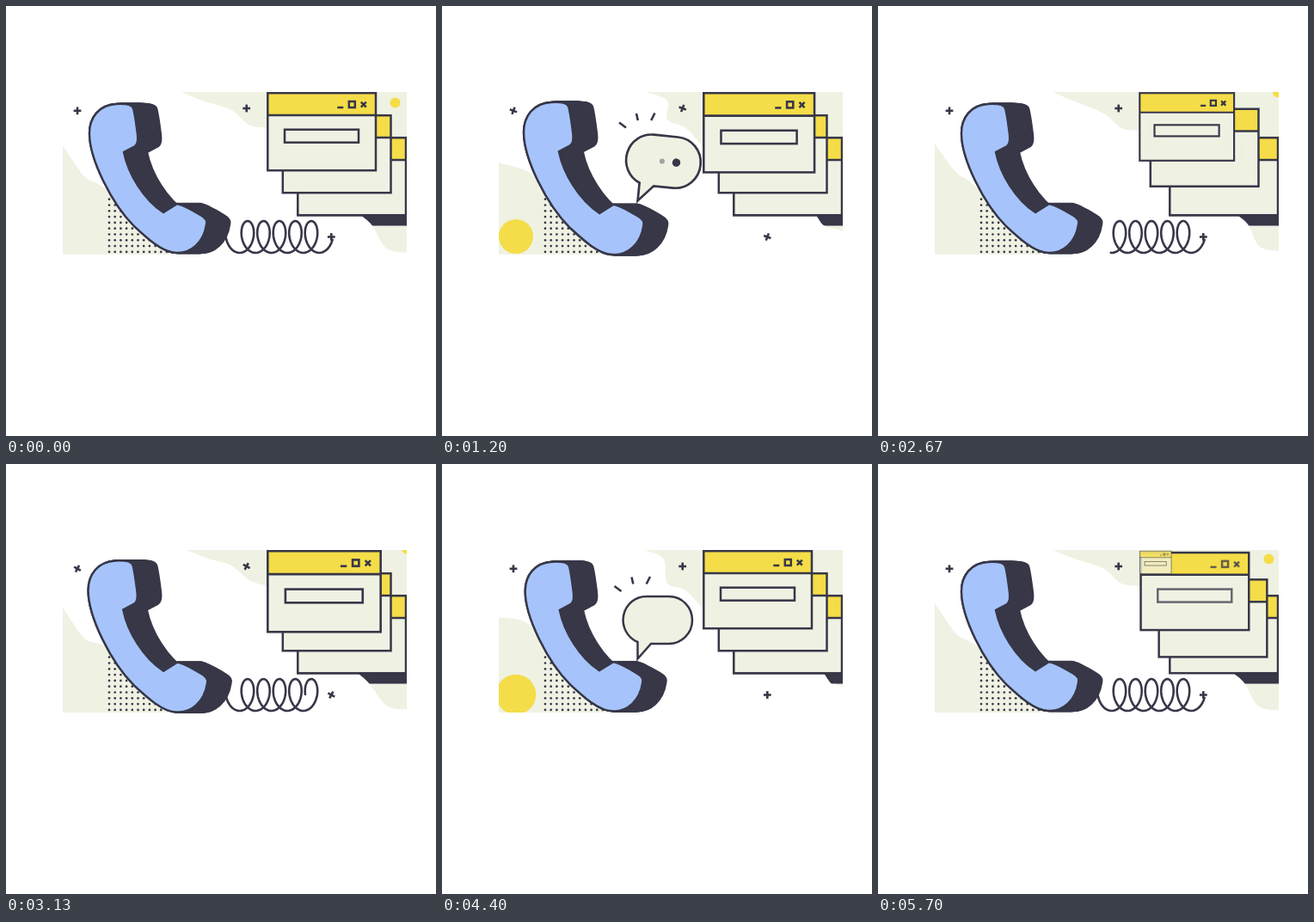
Write an HTML page with a canvas that moves like this. It is 500 px wide and 500 px high and loops after 5730 ms.

```html
<!DOCTYPE html>
<html lang="en">
<head>
<meta charset="utf-8">
<title>Phone and windows</title>
<style>
html, body { margin: 0; width: 100%; height: 100%; overflow: hidden; background: #fff; }
canvas { display: block; width: 500px; height: 500px; }
</style>
</head>
<body>
<canvas id="stage" width="500" height="500"></canvas>
<script>
const ctx = document.getElementById('stage').getContext('2d');
const CYCLE = 2865, BEAT = CYCLE / 3, TYPING = CYCLE / 2;
const DARK = '#373748', CREAM = '#eff2e3', YELLOW = '#f4dd48', BLUE = '#a6c4fb';

const ramp = (t, a, b) => Math.max(0, Math.min(1, (t - a) / (b - a)));
const ease = (t, a, b) => { const u = ramp(t, a, b); return u * u * (3 - 2 * u); };
const mix = (a, b, u) => a + (b - a) * u;

// Edge points: x, y, sway in x and y, and the part of the cycle where the sway peaks.
const leftEdge = [[66, 171, 0, 11, 0.4], [90, 190, 0, 12, 0.15], [104, 198, 0, 10, 0.12],
  [118, 211, 0, 3, 0.9]];
const topEdge = [[220, 100, 17, 0, 0.45], [244, 110, 18, 0, 0.42], [262, 129, 0, 11, 0.62],
  [283, 142, 0, 8, 0.68], [304, 155, 0, 14, 0.55]];
const lowEdge = [[428, 244, 18, 0, 0.6], [438, 255, 16, 0, 0.61], [450, 269, -8, 13, 0.03],
  [466, 273, 0, 14, 0.02]];

const phone = new Path2D('M128,114Q146,113 148,119Q150,126 153,150Q154,160 150,163L137,170' +
  'C142,195 160,225 183,240L199,230Q206,231 226,243Q235,248 233,254C230,275 215,288 198,287' +
  'C182,287 163,269 149,256C123,230 97,178 97,148C97,130 108,115 128,114Z');
const bubble = new Path2D('M227.5,207L227.5,226.5L243,209H264A27,27.5 0 0 0 264,154H238' +
  'A27,27.5 0 0 0 227.5,207Z');

function line(...p) {
  ctx.beginPath();
  for (let i = 0; i < p.length; i += 2) ctx.lineTo(p[i], p[i + 1]);
  ctx.stroke();
}

function disc(x, y, r, color) {
  ctx.fillStyle = color;
  ctx.beginPath();
  ctx.arc(x, y, r, 0, 7);
  ctx.fill();
}

// Scales and turns whatever is drawn next around a fixed point.
function pivot(x, y, scale, angle = 0) {
  ctx.translate(x, y);
  ctx.rotate(angle);
  ctx.scale(scale, scale);
  ctx.translate(-x, -y);
}

// Fills the area between a swaying smooth edge and the given corners.
function blob(t, edge, ...corners) {
  const p = edge.map(([x, y, dx, dy, peak]) => {
    const sway = Math.cos(2 * Math.PI * (t / CYCLE - peak));
    return [x + dx * sway, y + dy * sway];
  });
  ctx.beginPath();
  ctx.moveTo(...p[0]);
  for (let i = 0; i < p.length - 1; i++) {
    const a = p[i], b = p[i + 1], before = p[i - 1] || a, after = p[i + 2] || b;
    ctx.bezierCurveTo(a[0] + (b[0] - before[0]) / 6, a[1] + (b[1] - before[1]) / 6,
      b[0] - (after[0] - a[0]) / 6, b[1] - (after[1] - a[1]) / 6, b[0], b[1]);
  }
  corners.forEach(c => ctx.lineTo(...c));
  ctx.closePath();
  ctx.fillStyle = CREAM;
  ctx.fill();
}

function drawBackground(t) {
  blob(t, leftEdge, [150, 230], [190, 289], [66, 289]);
  blob(t, topEdge, [466, 160], [466, 100]);
  ctx.save();
  blob(t, lowEdge, [466, 244]);
  ctx.clip();
  ctx.fillStyle = DARK;
  ctx.fillRect(400, 240, 66, 15.5);
  ctx.restore();

  const gone = ease(t, 2130, 2560);
  const radius = mix(20, 29, ramp(t, 1200, 2130)) * ease(t, 500, 1000) * (1 - gone);
  disc(86 - 14 * gone, 268 + 16 * gone, radius, YELLOW);

  const untilReset = Math.min(Math.abs(t - 25), CYCLE + 25 - t);
  disc(451 + 0.063 * untilReset, 114 - 0.063 * untilReset, 6, YELLOW);

  for (let row = 0; row < 10; row++)
    for (let col = 0; col < 11; col++)
      disc(120 + col * 6.7, 224.7 + row * 6.8, 1.35, DARK);
}

// The cord retracts into its right end's path, then redraws from right to left.
function drawCord(t) {
  const first = -0.25, last = 5.23, returning = t > CYCLE / 2;
  const from = returning ? mix(last, first, ramp(t, 1885, 2705)) : first;
  const to = returning ? last : mix(last, first, ramp(t, 195, 1010));
  if (from === to) return;
  ctx.lineWidth = 2.6;
  ctx.beginPath();
  for (let i = 0, n = 240; i <= n; i++) {
    const turn = mix(from, to, i / n), a = turn * 2 * Math.PI;
    ctx.lineTo(271.7 + 18.5 * turn + 11.5 * Math.sin(a), 268.5 + 18.5 * Math.cos(a));
  }
  ctx.stroke();
}

function drawPluses(beat) {
  const turn = ramp(beat, 190, 270) * (1 - ramp(beat, 280, 560)) * Math.PI / 6;
  ctx.lineWidth = 2.6;
  for (const [x, y] of [[83, 121.8], [279.7, 119], [378.3, 268.5]]) {
    ctx.save();
    pivot(x, y, 1, turn);
    line(x - 4.4, y, x + 4.4, y);
    line(x, y - 4.4, x, y + 4.4);
    ctx.restore();
  }
}

function drawBubble(t, beat) {
  const typing = t % TYPING;
  const show = ease(t, 500, 700) * (1 - ease(t, 2450, 2650));
  const tilt = ease(beat, 221, 245) * (1 - ease(beat, 435, 570));
  if (show === 0) return;

  ctx.save();
  pivot(227.5, 227, show * (1 + 0.08 * tilt), tilt * 0.1);
  ctx.fillStyle = CREAM;
  ctx.fill(bubble);
  ctx.lineWidth = 2.5;
  ctx.stroke(bubble);
  for (let i = 0; i < 3; i++) {
    const left = 1 - ramp(typing, 1080 + 80 * i, 1150 + 80 * i);
    ctx.globalAlpha = ramp(typing, 460 + 90 * i, 550 + 90 * i) * left;
    disc(234 + 15.4 * i, 181.5, 4.4 * Math.sqrt(left), DARK);
  }
  ctx.restore();

  ctx.save();
  ctx.globalAlpha = show;
  ctx.translate(5.5 * tilt, -6.5 * tilt);
  line(200.5, 142, 208.5, 148);
  line(220.5, 131.5, 222.3, 139.5);
  line(242, 131, 237.7, 139.5);
  ctx.restore();
}

function drawPhone(t) {
  const swell = ease(t, 100, 690) * (1 - ramp(t, 690, 1750)) ** 2;
  ctx.save();
  pivot(179, 200, 1 + 0.09 * swell);
  ctx.lineWidth = 2.4;
  ctx.fillStyle = DARK;
  // Sweep the outline sideways to give the handset its depth.
  for (let x = 0; x <= 27; x++) {
    ctx.save();
    ctx.translate(x, 0);
    ctx.fill(phone);
    ctx.stroke(phone);
    ctx.restore();
  }
  ctx.fillStyle = BLUE;
  ctx.fill(phone);
  ctx.stroke(phone);
  ctx.restore();
}

function drawWindow(place, scale, detail, alpha = 1) {
  ctx.save();
  ctx.globalAlpha = alpha;
  ctx.translate(304.3 + 17.5 * place, 101.2 + 26 * place);
  ctx.scale(scale, scale);
  ctx.lineWidth = 2.5;
  ctx.fillStyle = CREAM;
  ctx.fillRect(0, 0, 125.7, 90);
  ctx.fillStyle = YELLOW;
  ctx.fillRect(0, 0, 125.7, 25.8);
  ctx.strokeRect(0, 0, 125.7, 90);
  line(0, 25.8, 125.7, 25.8);
  ctx.globalAlpha *= detail;
  ctx.strokeRect(19.7, 42.5, 86, 15);
  line(81, 16.8, 88, 16.8);
  ctx.strokeRect(94.5, 9.8, 7, 7);
  line(108.5, 10.5, 114.5, 16.5);
  line(114.5, 10.5, 108.5, 16.5);
  ctx.restore();
}

// The front window shrinks away while the ones behind step forward.
function drawWindows(beat) {
  const grow = 1 + 0.047 * ramp(beat, 222, 268) * (1 - ease(beat, 435, 575));
  const leave = ramp(beat, 640, 980);
  const step = ease(beat, 640, 982);
  drawWindow(2, 1, 0);
  drawWindow(2 - ramp(beat, 850, BEAT), 1, 0);
  drawWindow(1 - step, 1, step ** 4);
  drawWindow(0, grow * (1 - leave * leave), 1, 1 - 0.5 * leave ** 4);
}

function draw(now) {
  const t = now % CYCLE, beat = t % BEAT;
  ctx.fillStyle = '#fff';
  ctx.fillRect(0, 0, 500, 500);
  ctx.strokeStyle = DARK;
  ctx.save();
  ctx.beginPath();
  ctx.rect(66, 100, 400, 189);
  ctx.clip();
  drawBackground(t);
  drawCord(t);
  drawPluses(beat);
  drawBubble(t, beat);
  drawWindows(beat);
  ctx.restore();
  drawPhone(t);
}

const start = performance.now();
function tick() {
  draw(performance.now() - start);
  requestAnimationFrame(tick);
}
tick();
</script>
</body>
</html>
```
